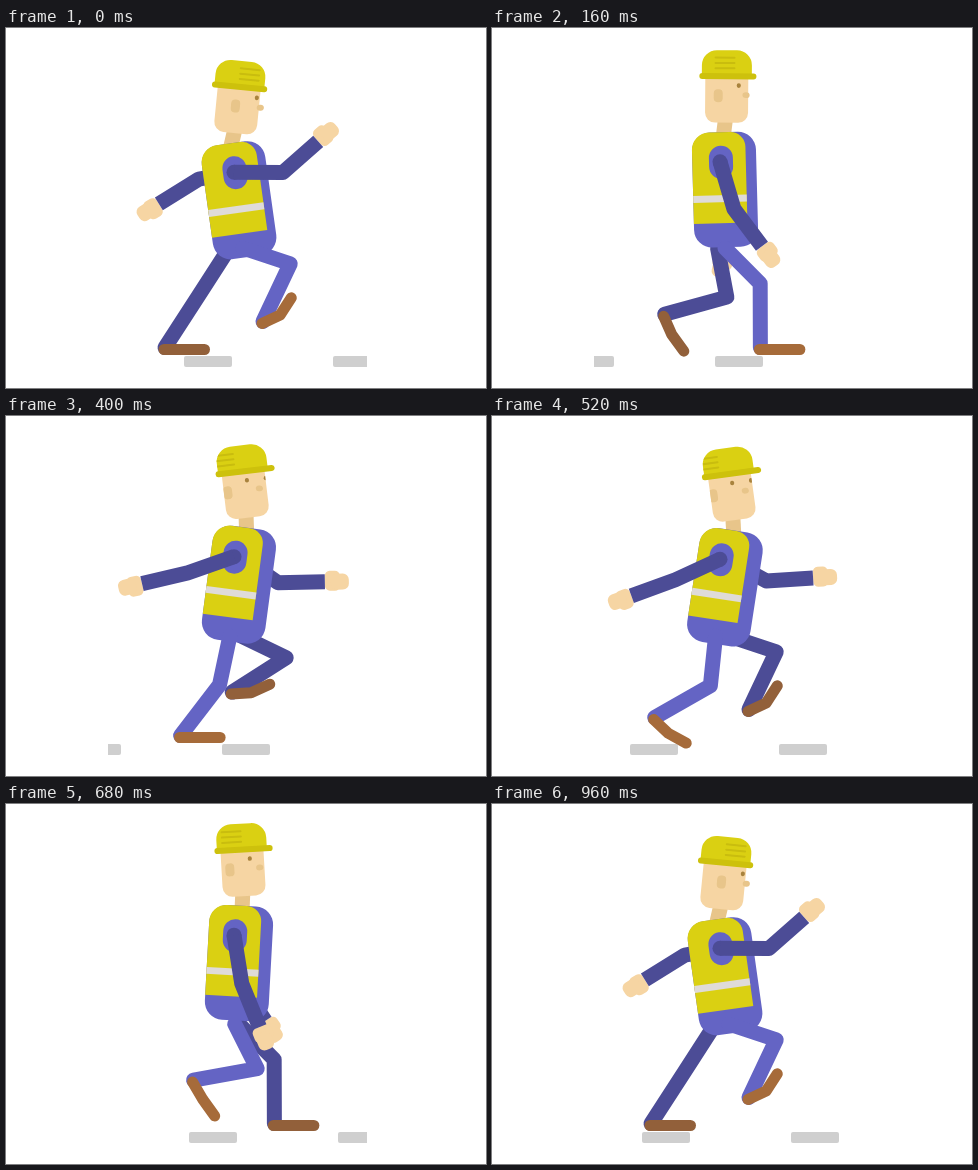
Recreate the animation shown at these times as an HTML page with a canvas. Size 480x360 px, loop 1 s.

```html
<!DOCTYPE html>
<html lang="en">
<head>
<meta charset="utf-8">
<title>Walking builder</title>
<style>
  html, body { margin: 0; width: 100%; height: 100%; overflow: hidden; background: #fff; }
  canvas { display: block; width: 480px; height: 360px; }
</style>
</head>
<body>
<canvas id="stage" width="480" height="360"></canvas>
<script>
const ctx = document.getElementById('stage').getContext('2d');
const { PI, sin, cos, min, max, hypot } = Math;
const LOOP = 1000, STEP = 40, CYCLE = 960;
const RAD = PI / 180;
const COL = {
  light: '#6464c4', dark: '#4c4c96', vest: '#dad012', brim: '#cdc10c', rib: '#c9bd0e',
  stripe: '#dfdbd8', skin: '#f6d5a3', tan: '#e8c58a', eye: '#a9833d',
  shoe: '#a66b3a', farShoe: '#92603a', ground: '#cfcfcf'
};

// A mean plus harmonics of the walk cycle, each given as [cosine, sine].
const swing = (mean, ...parts) => t => parts.reduce((sum, [c, s], i) => {
  const a = (i + 1) * 2 * PI * t / CYCLE;
  return sum + c * cos(a) + s * sin(a);
}, mean);

const lean = swing(1.2, [-7.75, 0], [-0.6, 0], [-0.85, 0]);
const bob = swing(164.7, [0, 0], [7, 0]);
const hipX = swing(230, [6.8, -0.5]);
const nearUpper = swing(85, [-76, 22], [-2.3, 0], [-6.4, 0]);
const nearFore = swing(69.7, [-99.2, 27], [-4.5, 0], [-7.5, 0]);
const farUpper = swing(91.2, [64.9, -22.3], [5.8, -9.5], [8.1, 0]);
const farFore = swing(70, [78, -7]);
const farShoulder = swing(236, [4, 0]);

// The foot slides back along the ground, then lifts and swings forward.
const FRONT = 283, BACK = 158, FLOOR = 321.5, LAND = 120, LIFT = 440;
function footAt(time) {
  const u = (time - LAND + 2 * CYCLE) % CYCLE;
  const stance = LIFT - LAND;
  if (u <= stance) {
    return { ankle: [FRONT + (BACK - FRONT) * u / stance, FLOOR], heel: 0, toe: 0 };
  }
  const s = (u - stance) / (CYCLE - stance);
  const arc = sin(PI * s);
  return {
    ankle: [BACK + (FRONT - BACK) * s * s * (2 - s), FLOOR - 47 * arc],
    heel: 45 * sin(2 * PI * s) + 30 * arc,
    toe: 58 * sin(2 * PI * s ** 1.2)
  };
}

const polar = (p, deg, len) => [p[0] + len * cos(deg * RAD), p[1] + len * sin(deg * RAD)];

function line(points, color, width, cap = 'round') {
  ctx.beginPath();
  points.forEach(p => ctx.lineTo(p[0], p[1]));
  ctx.strokeStyle = color;
  ctx.lineWidth = width;
  ctx.lineCap = cap;
  ctx.lineJoin = 'round';
  ctx.stroke();
}

function box(x, y, w, h, r, color) {
  ctx.beginPath();
  ctx.roundRect(x, y, w, h, r);
  ctx.fillStyle = color;
  ctx.fill();
}

function oval(x, y, rx, ry, color) {
  ctx.beginPath();
  ctx.ellipse(x, y, rx, ry, 0, 0, 2 * PI);
  ctx.fillStyle = color;
  ctx.fill();
}

function placed(x, y, deg, draw) {
  ctx.save();
  ctx.translate(x, y);
  ctx.rotate(deg * RAD);
  draw();
  ctx.restore();
}

function clipped(x, y, w, h, r, draw) {
  ctx.save();
  ctx.beginPath();
  ctx.roundRect(x, y, w, h, r);
  ctx.clip();
  draw();
  ctx.restore();
}

// Two-bone reach, bending forward.
function kneeOf(hip, ankle) {
  const A = 50, B = 66;
  const dx = ankle[0] - hip[0], dy = ankle[1] - hip[1];
  const real = hypot(dx, dy), d = min(real, A + B);
  const along = (A * A - B * B + d * d) / (2 * d);
  const out = Math.sqrt(max(0, A * A - along * along));
  const ux = dx / real, uy = dy / real;
  return [hip[0] + ux * along + uy * out, hip[1] + uy * along - ux * out];
}

function leg(t, color, shoe) {
  const hip = [hipX(t), 220];
  const { ankle, heel, toe } = footAt(t);
  line([hip, kneeOf(hip, ankle), [ankle[0] + 1, ankle[1] - 2]], color, 15);
  const ball = polar(ankle, heel, 20);
  line([ankle, ball, polar(ball, toe, 20.5)], shoe, 11);
}

function arm(shoulder, upper, fore, length) {
  const elbow = polar(shoulder, upper, length);
  const wrist = polar(elbow, fore, 47);
  placed(wrist[0], wrist[1], fore, () => {
    box(0, -11, 15, 20, 5, COL.skin);
    box(6, -8, 18, 16, 6, COL.skin);
  });
  oval(shoulder[0], shoulder[1], 7.5, 7.5, COL.dark);
  line([shoulder, elbow, wrist], COL.dark, 15, 'butt');
}

function torso(cy, r) {
  placed(233, cy, r, () => {
    const w = 53 - 0.35 * r;
    box(-32, -57, 64, 115, 18, COL.light);
    box(-32, -57, w, 91, [17, 15, 0, 0], COL.vest);
    ctx.fillStyle = COL.stripe;
    ctx.fillRect(-32, 6, w, 7);
  });
}

// Face and helmet details slide sideways as the head turns.
function head(cy, r) {
  const x = 235.5 + 0.55 * r, y = cy - 90;
  const base = [233 + 57 * sin(r * RAD), cy - 54];
  line([[x, y + 10], base], COL.tan, 15, 'butt');
  placed(x, y, -0.8 * r - 0.8, () => {
    box(-21.5, -32, 43, 55.5, 10, COL.skin);
    oval(18.5 - 0.55 * r, -4.2, 3.6, 2.9, COL.tan);
    clipped(-21.5, -32, 43, 55.5, 10, () => {
      const eye = 10.5 - r;
      box(-14.5 - r, -10, 9, 13, 4, COL.tan);
      oval(eye, -13.7, 2.1, 2.3, COL.eye);
      oval(eye + 19, -13.7, 2.1, 2.3, COL.eye);
    });
    box(-25, -49, 50, 27, [15, 15, 0, 0], COL.vest);
    clipped(-25, -49, 50, 27, [15, 15, 0, 0], () => {
      const rib = -4 - 1.7 * r;
      for (let i = 0; i < 3; i++) {
        line([[rib - 10, -41.5 + 5.3 * i], [rib + 9, -41.5 + 5.3 * i]], COL.rib, 2);
      }
    });
    box(-27.5, -26, 57.5 + 0.25 * r, 6, 3, COL.brim);
  });
}

// Evenly spaced dashes run left under the feet.
function ground(t) {
  const gap = 149, start = 327 - 0.65 * t;
  clipped(102, 326, 259, 14, 0, () => {
    for (let x = start % gap - gap; x < 361; x += gap) box(x, 328, 48, 11, 2, COL.ground);
  });
}

function draw(t) {
  const cy = bob(t), r = lean(t);
  ctx.fillStyle = '#fff';
  ctx.fillRect(0, 0, 480, 360);
  ground(t);
  arm([farShoulder(t), cy - 29], farUpper(t), farFore(t), 48);
  leg(t + 440, COL.dark, COL.farShoe);
  head(cy, r);
  torso(cy, r);
  leg(t, COL.light, COL.shoe);
  placed(229, cy - 27, r, () => box(-12, -16.5, 24, 33, 12, COL.light));
  arm([228, cy - 27.5], nearUpper(t), nearFore(t), 49);
}

function tick() {
  draw(Math.floor((performance.now() % LOOP) / STEP) * STEP);
  requestAnimationFrame(tick);
}
tick();
</script>
</body>
</html>
```
